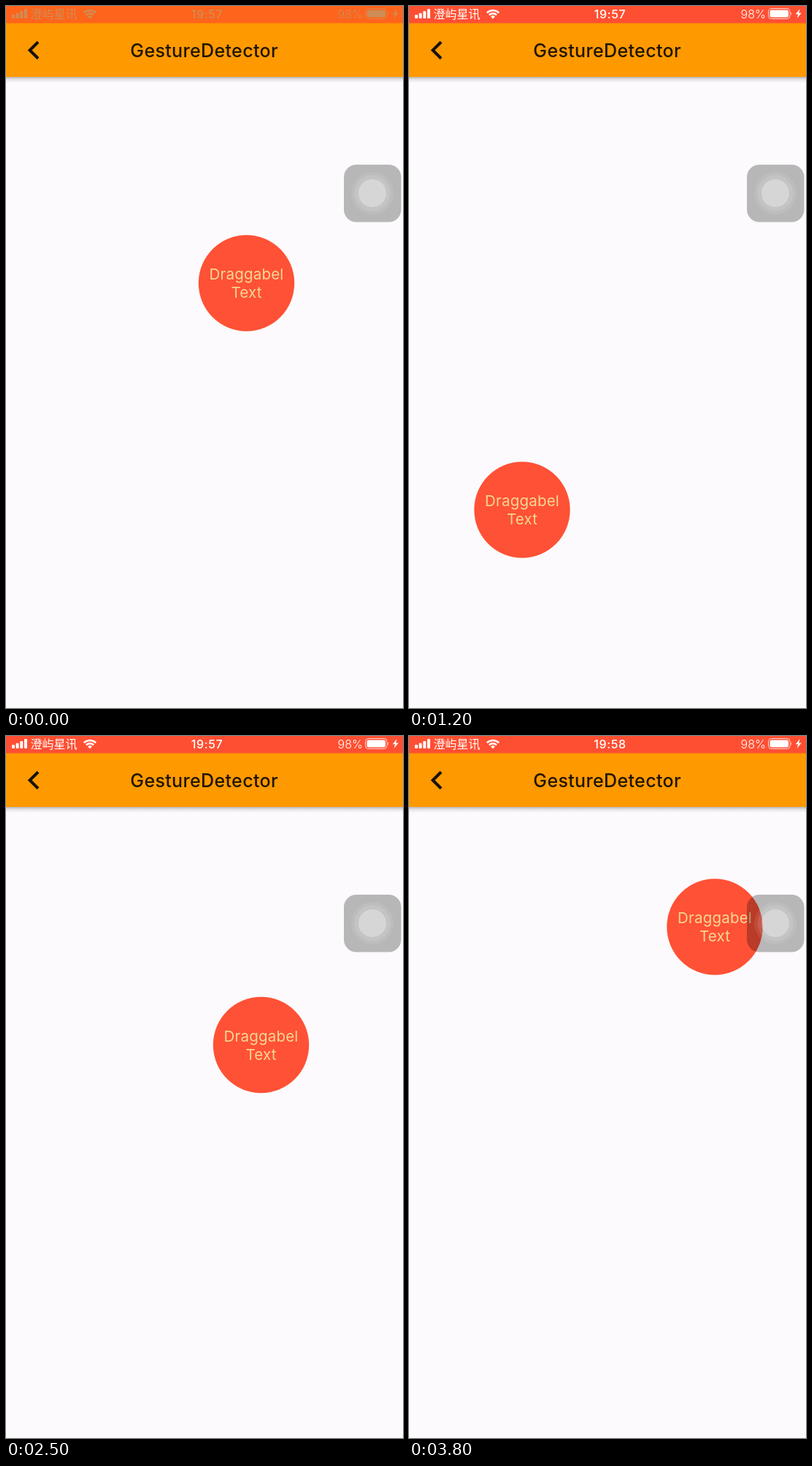
Animation of 544x960 px, one loop 3.9 s. Source, as an HTML page:

```html
<!DOCTYPE html>
<html lang="zh">
<head>
<meta charset="utf-8">
<title>Draggable circle</title>
<style>
  html, body { margin: 0; width: 100%; height: 100%; overflow: hidden; background: #fcfafc; }
  svg { display: block; width: 100vw; height: 100vh; font-family: Inter, Roboto, sans-serif; }
  text { white-space: pre; }
  .mid { text-anchor: middle; }
  #bar { fill: #ff4f32; }
  #status { color: #fff; fill: currentColor; font-size: 16px; }
  .dim #bar { fill: #ff641c; }
  .dim #status { color: #cf8c55; }
  .carrier { font: 300 16px "Noto Sans CJK SC", "Noto Sans CJK", sans-serif; }
  .line { fill: none; stroke: currentColor; }
  #ball text { font-size: 20.5px; letter-spacing: .2px; fill: #f6d795; }
</style>
</head>
<body>
<svg id="stage" viewBox="0 0 544 960">
  <defs>
    <linearGradient id="shade" x2="0" y2="1">
      <stop offset="0" stop-opacity=".27"/>
      <stop offset=".45" stop-opacity=".09"/>
      <stop offset="1" stop-opacity="0"/>
    </linearGradient>
  </defs>

  <rect width="544" height="960" fill="#fcfafc"/>
  <rect y="97" width="544" height="8" fill="url(#shade)"/>
  <rect y="20" width="544" height="77" fill="#ff9900"/>
  <rect id="bar" width="544" height="23.5"/>

  <g id="status">
    <rect x="8" y="12" width="4" height="5" rx="1"/>
    <rect x="13.6" y="9.8" width="4" height="7.2" rx="1"/>
    <rect x="19.3" y="7" width="4" height="10" rx="1"/>
    <rect x="25" y="4" width="4" height="13" rx="1"/>
    <text class="carrier" x="33.5" y="16.8">澄屿星讯</text>
    <g class="line" stroke-width="2.5">
      <path d="M106.8 9.3a11.6 11.6 0 0 1 16.4 0"/>
      <path d="M109.9 12.4a7.2 7.2 0 0 1 10.2 0"/>
    </g>
    <path d="M115 17.4l-2.9-2.9a4.1 4.1 0 0 1 5.8 0z"/>
    <text id="clock" class="mid" x="275.5" y="16.6" font-weight="500" letter-spacing=".6">19:57</text>
    <text x="454.5" y="16.8" font-weight="300">98%</text>
    <rect class="line" x="492.5" y="3.5" width="29.5" height="14" rx="4" opacity=".75"/>
    <rect x="494.5" y="5.5" width="25.5" height="10" rx="2.2"/>
    <path d="M523.3 8q2 2.5 0 5z" opacity=".75"/>
    <path d="M535.5 4l-5.7 7.3h3.4l-1.5 5.7 6-7.6h-3.5z"/>
  </g>

  <path d="M44 49.3L32.6 60.5 44 71.7" fill="none" stroke="#17120c" stroke-width="4"/>
  <text class="mid" x="271.7" y="69.6" font-size="25" font-weight="500" letter-spacing=".35" fill="#1f1500">GestureDetector</text>

  <g id="ball">
    <circle r="65.7" fill="#ff5135"/>
    <text class="mid" y="-4.7">Draggabel</text>
    <text class="mid" y="20.4">Text</text>
  </g>

  <g fill="#fff">
    <rect x="463" y="217" width="78.5" height="78.5" rx="17" fill="#000" fill-opacity=".27"/>
    <circle cx="502" cy="256" r="29" fill-opacity=".08"/>
    <circle cx="502" cy="256" r="24.5" fill-opacity=".1"/>
    <circle cx="502" cy="256" r="19" fill-opacity=".3"/>
  </g>
</svg>
<script>
  const LOOP = 3900, STEP = 100;
  const $ = id => document.getElementById(id);
  const stage = $('stage'), ball = $('ball'), clock = $('clock');

  // Drag path: time, x, y
  const path = [
    [0, 329.5, 379], [400, 329.5, 379], [800, 277.5, 441], [1000, 185, 660],
    [1200, 155, 689], [1400, 285, 625], [1600, 375, 425], [1800, 360, 317],
    [2000, 200, 470], [2100, 190, 635], [2200, 250, 636], [2500, 349.5, 422.5],
    [2700, 290, 335], [2900, 183, 403], [3150, 145, 510], [3400, 175, 616],
    [3500, 225, 676], [3600, 320, 590], [3800, 419, 261]
  ];

  function slope(i, k) {
    if (i < 2) return 0;
    const a = path[i - 1], b = path[Math.min(i + 1, path.length - 1)];
    return (b[k] - a[k]) / (b[0] - a[0]);
  }

  // Cubic Hermite curve through the path points
  function along(t, k) {
    let i = 0;
    while (i < path.length - 2 && t >= path[i + 1][0]) i++;
    const a = path[i], b = path[i + 1], d = b[0] - a[0], u = (t - a[0]) / d;
    const e = u * u * (3 - 2 * u);
    return a[k] + (b[k] - a[k]) * e
      + d * u * (1 - u) * ((1 - u) * slope(i, k) - u * slope(i + 1, k));
  }

  function draw(now) {
    const t = Math.floor(now % LOOP / STEP) * STEP;
    ball.setAttribute('transform', `translate(${along(t, 1).toFixed(1)} ${along(t, 2).toFixed(1)})`);
    stage.classList.toggle('dim', t < STEP);
    clock.textContent = t < 3500 ? '19:57' : '19:58';
  }

  let start;
  function tick(now) {
    start ??= now;
    draw(now - start);
    requestAnimationFrame(tick);
  }
  draw(0);
  requestAnimationFrame(tick);
</script>
</body>
</html>
```
